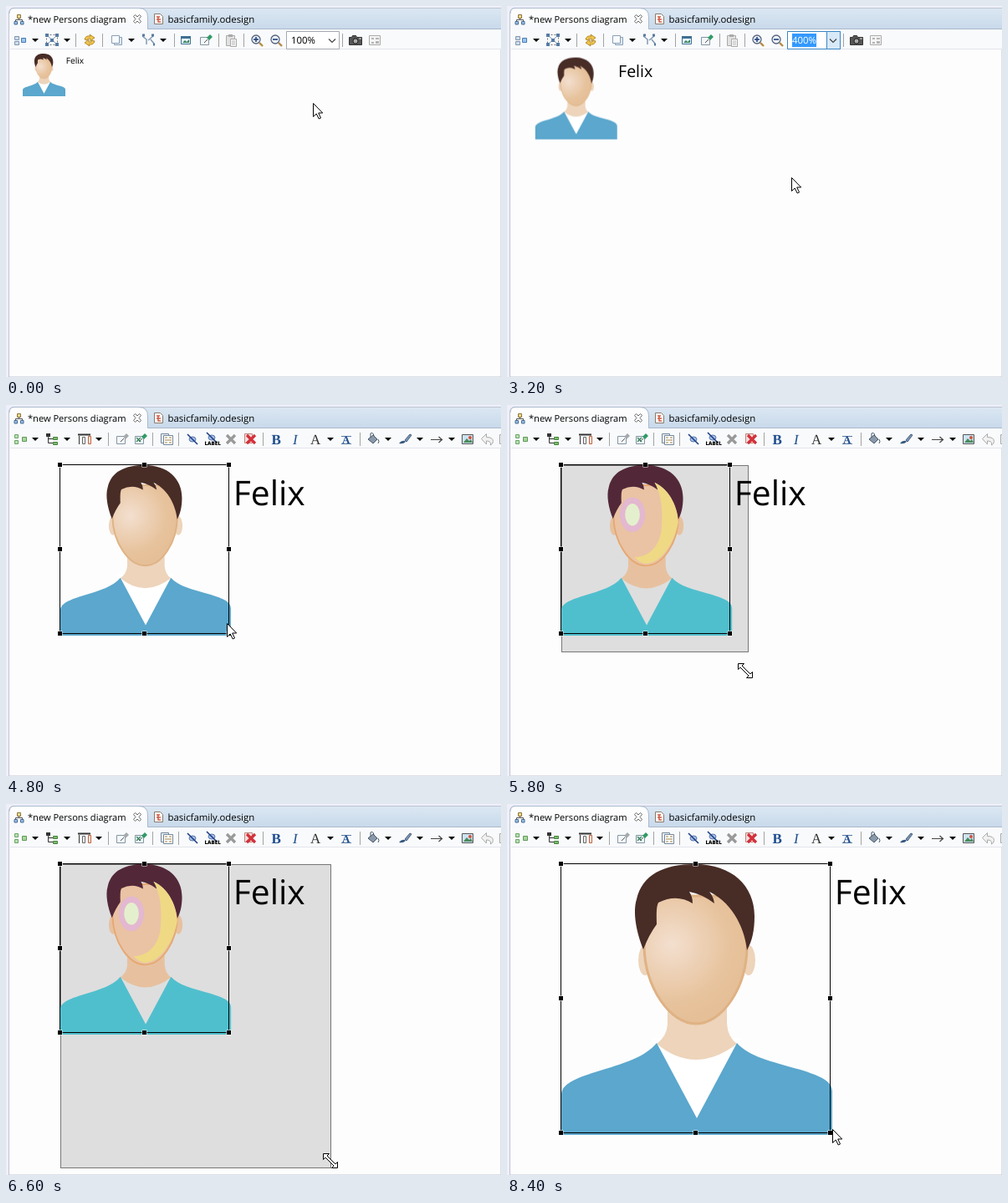
Recreate the animation shown at these times as an HTML page. Size 592 px wide and 444 px high, loop 9200 ms.

```html
<!DOCTYPE html>
<html lang="en">
<head>
<meta charset="utf-8">
<title>Persons diagram</title>
<style>
html, body { margin: 0; width: 100%; height: 100%; overflow: hidden; background: #fdfdfd; }
svg { display: block; }
text { font: 11.4px "Open Sans", "Noto Sans", sans-serif; text-rendering: geometricPrecision; }
.serif { font: 17px "Liberation Serif", "Noto Serif", serif; }

/* Portrait palette */
#scene { --hair: #482c26; --face: url(#skin); --edge: #dfb284; --neck: #edd4bb; --shirt: #5ba7cd; --collar: #fff; }
#ghost { --hair: #522838; --face: #eac3a4; --edge: #e6a873; --neck: #e7c19f; --shirt: #50bfcd; --collar: #dedede; }
.hair { fill: var(--hair); }
.face { fill: var(--face); stroke: var(--edge); stroke-width: 3; }
.neck { fill: var(--neck); }
.shirt { fill: var(--shirt); }
.collar { fill: var(--collar); }
.sel { fill: none; stroke: #000; marker: url(#handle); }

/* One loop is 46 steps of 200 ms */
.k { animation: 9.2s step-end infinite; }
#arrow { animation-name: arrow; }
#sizer { animation-name: sizer; }
#scene { animation-name: zoom; }
#man1 { animation-name: grow; }
#label { animation-name: shift; }
#ghost { animation-name: ghost; }
#rubber { animation-name: rubber; }
#small { animation-name: small; }
#large { animation-name: large; }
#tools2 { animation-name: tools2; }
#hot { animation-name: hot; }
#marked { animation-name: marked; }
#p100 { animation-name: p100; }
#p400 { animation-name: p400; }
#list { animation-name: list; }
.row { animation-name: row; }

@keyframes arrow {
  0% { transform: translate(367px, 116px); visibility: visible; }
  2.17% { transform: translate(368px, 109px); }
  4.34% { transform: translate(372px, 94px); }
  6.52% { transform: translate(378px, 74px); }
  8.69% { transform: translate(384px, 55px); }
  10.86% { transform: translate(386px, 45px); }
  13.04% { transform: translate(385px, 43px); }
  21.73% { transform: translate(380px, 75px); }
  23.91% { transform: translate(358px, 152px); }
  26.08% { transform: translate(342px, 203px); }
  28.26% { transform: translate(340px, 205px); }
  41.3% { transform: translate(330px, 214px); }
  43.47% { transform: translate(298px, 236px); }
  45.65% { transform: translate(262px, 254px); }
  49.99% { transform: translate(264px, 258px); }
  52.17% { transform: translate(264px, 261px); visibility: visible; }
  54.34% { transform: translate(389px, 415px); visibility: hidden; }
  86.95% { transform: translate(389px, 415px); visibility: visible; }
  89.13% { transform: translate(391px, 396px); }
  91.3%, 100% { transform: translate(389px, 389px); visibility: visible; }
}
@keyframes sizer {
  0% { visibility: hidden; transform: translate(267px, 273px); }
  54.34% { visibility: visible; transform: translate(267px, 273px); }
  60.86% { transform: translate(274px, 290px); }
  63.04% { transform: translate(285px, 318px); }
  65.21% { transform: translate(309px, 346px); }
  67.39% { transform: translate(340px, 381px); }
  69.56% { transform: translate(370px, 412px); }
  71.73% { transform: translate(388px, 427px); visibility: visible; }
  86.95%, 100% { transform: translate(388px, 427px); visibility: hidden; }
}
@keyframes zoom {
  0% { transform: translate(5px, 52px) scale(1); }
  32.6% { transform: translate(5px, 52px) scale(1.36); }
  34.78% { transform: translate(5px, 52px) scale(1.92); }
  36.95% { transform: translate(5px, 52px) scale(2.8); }
  39.13%, 100% { transform: translate(5px, 52px) scale(4); }
}
@keyframes grow {
  0% { transform: translate(15px, 5px) scale(.1574); }
  80.43%, 100% { transform: translate(15px, 5px) scale(.25); }
}
@keyframes shift {
  0% { transform: none; }
  80.43%, 100% { transform: translate(30px, 0); }
}
@keyframes ghost {
  0%, 80.43%, 100% { visibility: hidden; }
  56.52% { visibility: visible; }
}
@keyframes rubber {
  0% { width: 201px; height: 201px; }
  60.86% { width: 209px; height: 208px; }
  63.04% { width: 223px; height: 223px; }
  65.21% { width: 246px; height: 263px; }
  67.39% { width: 277px; height: 305px; }
  69.56% { width: 306px; height: 343px; }
  71.73%, 100% { width: 323px; height: 363px; }
}
@keyframes small {
  0%, 80.43%, 100% { visibility: hidden; }
  49.99% { visibility: visible; }
}
@keyframes large {
  0% { visibility: hidden; }
  80.43%, 100% { visibility: visible; }
}
@keyframes tools2 {
  0% { visibility: hidden; }
  49.99%, 100% { visibility: visible; }
}
@keyframes hot {
  0% { visibility: hidden; }
  8.69%, 100% { visibility: visible; }
}
@keyframes marked {
  0% { visibility: hidden; }
  15.21%, 100% { visibility: visible; }
}
@keyframes p100 {
  0% { fill: #000; visibility: visible; }
  15.21% { fill: #fff; visibility: visible; }
  30.43%, 100% { fill: #fff; visibility: hidden; }
}
@keyframes p400 {
  0% { visibility: hidden; }
  30.43%, 100% { visibility: visible; }
}
@keyframes list {
  0%, 30.43%, 100% { visibility: hidden; }
  15.21% { visibility: visible; }
}
@keyframes row {
  0% { transform: translate(0, 75px); }
  21.73% { transform: translate(0, 15px); }
  23.91% { transform: translate(0, 90px); }
  26.08%, 100% { transform: translate(0, 150px); }
}
</style>
</head>
<body>
<svg width="592" height="444" viewBox="0 0 592 444">
<defs>
  <linearGradient id="bar" x2="0" y2="1">
    <stop stop-color="#dbe7f3"/><stop offset="1" stop-color="#c8d9ea"/>
  </linearGradient>
  <linearGradient id="tab" x2="0" y2="1">
    <stop stop-color="#fff"/><stop offset="1" stop-color="#f6f8fb"/>
  </linearGradient>
  <radialGradient id="skin" gradientUnits="userSpaceOnUse" cx="132" cy="96" r="92">
    <stop stop-color="#f3dfcf"/><stop offset=".75" stop-color="#e7c39d"/><stop offset="1" stop-color="#e5bf97"/>
  </radialGradient>
  <marker id="handle" markerUnits="userSpaceOnUse" markerWidth="7" markerHeight="7" refX="3.5" refY="3.5">
    <path fill="#fff" d="M.5 .5h6v6h-6z"/><path d="M1 1h5v5h-5z"/>
  </marker>
  <clipPath id="picked"><rect class="k row" x="336" y="54" width="62" height="15"/></clipPath>

  <path id="dn" d="M-4 39h8l-4 4z"/>
  <path id="sep" d="M.5 33v16" stroke="#a3a3a3"/>
  <g id="lens">
    <path d="M3 44l4 4" stroke="#b58a45" stroke-width="2.4"/>
    <circle cx="-1" cy="40" r="5" fill="#eef5fc" stroke="#55617c" stroke-width="1.3"/>
    <path d="M-4 40h6" stroke="#20407c" stroke-width="1.6"/>
  </g>
  <g id="pin">
    <path d="M-6.5 37.5h10v9h-10z" fill="#f4f7fa" stroke="#8296a5"/>
    <path d="M-2 44l4-4" stroke="#555"/>
    <path d="M1 38l4-4 3 3-4 4z"/>
  </g>
  <path id="cross" d="M-5 36l10 10M5 36l-10 10" stroke-width="3.2"/>
  <g id="hide">
    <ellipse cy="41" rx="4" ry="3" fill="#a9c0e4" stroke="#5676b0"/>
    <path d="M-6 35L6 47" stroke="#1d3f86" stroke-width="1.6"/>
  </g>

  <g id="man">
    <path class="collar" d="M108 208h108L162 308z"/>
    <path class="neck" d="M127 165v27q-1 14-13 23 46 38 96 0-11-8-12-24v-26z"/>
    <ellipse class="neck" cx="100" cy="115" rx="8" ry="18"/>
    <ellipse class="neck" cx="224" cy="115" rx="8" ry="18"/>
    <path class="face" d="M99 98C100 148 130 191 161 191S222 148 222 98L216 38H108z"/>
    <path class="hair" d="M98 102C90 82 85 58 90 42 97 12 123 0 160 0c44 0 71 26 71 62 0 18-3 30-9 41C220 82 208 48 177 33q5 6 6 14Q169 36 153 33q4 6 4 14Q138 35 116 46c-3 6-2 17-2 26q-9 12-16 30z"/>
    <path class="shirt" d="M0 324v-48c0-13 18-20 40-27 36-11 60-18 74-35l48 90 48-90c14 16 40 22 76 32 22 7 38 13 38 26v52z"/>
  </g>
</defs>

<!-- Window -->
<rect width="592" height="444" fill="#efeffa"/>
<path d="M3.5 444V9q0-6.500 6.500-6.500H592V444z" fill="#fdfdfd" stroke="#bfc5d2"/>
<path d="M4 28V9q0-6 6-6H592V28z" fill="url(#bar)"/>
<path d="M4 28V9q0-6 6-6H159q10 0 10.500 10V28z" fill="url(#tab)"/>
<path d="M4 9q0-6.500 6-6.500H159q10.500 0 10.500 10.500v14.500H592" fill="none" stroke="#a9b9cd"/>
<g stroke="#8a7440" fill="#f2d887">
  <path d="M15.500 14v3M11.500 19v-2.500h8V19" fill="none" stroke="#555"/>
  <path d="M13.500 10.500h4v4h-4z"/>
  <path d="M10 18.500h3.500V22H10zM17.500 18.500H21V22h-3.500z" fill="#9cc3e8" stroke="#456a94"/>
</g>
<text x="26" y="20" style="font-size:11.1px">*new Persons diagram</text>
<path d="M152.500 12.500l2-2 2.500 2.500 2.500-2.500 2 2-2.500 3 2.500 3-2 2-2.500-2.500-2.500 2.500-2-2 2.500-3z" fill="#fff" stroke="#666"/>
<path d="M177.500 9.500h7l3 3v9h-10z" fill="#fff" stroke="#8a7a6a"/>
<path d="M180 13h4M180 16h5M182 13v6h3" stroke="#d05b45" fill="none" stroke-width="1.500"/>
<text x="193.500" y="20">basicfamily.odesign</text>
<path d="M5 28H592v23H5z" fill="#f9fafb"/>
<path d="M5 51.500H592" stroke="#e3e5ea"/>

<!-- Diagram -->
<g id="scene" class="k">
  <use id="man1" class="k" href="#man"/>
</g>
<g id="ghost" class="k">
  <rect id="rubber" class="k" x="65.500" y="72.500" width="201" height="201" fill="#dedede" stroke="#000" stroke-dasharray="1 1"/>
  <g transform="translate(65 72) scale(.63)">
    <use href="#man"/>
    <path d="M177 33C208 48 220 82 222 108c-8 45-36 79-61 79-8 0-16-5-22-12 30 0 48-24 51-53 3-34 1-64-13-89z" fill="#efd985"/>
    <ellipse cx="135" cy="94" rx="24" ry="33" fill="#e3b8d0"/>
    <ellipse cx="135" cy="94" rx="14" ry="21" fill="#e4f0cd"/>
  </g>
</g>
<g class="k" style="animation-name:zoom">
  <text id="label" class="k" x="66.700" y="17" style="font-size:10.2px">Felix</text>
</g>
<path id="small" class="k sel" d="M64.500 71.500H165.500H266.500V172.500V273.500H165.500H64.500V172.500z"/>
<path id="large" class="k sel" d="M64.500 71.500H225.500H386.500V232.500V393.500H225.500H64.500V232.500z"/>

<!-- Diagram tools -->
<g fill="none">
  <path d="M10.500 36.500h5v4h-5zM10.500 42.500h5v4h-5z" fill="#cfdcea" stroke="#8096ad"/>
  <path d="M18.500 38.500h5v5h-5z" fill="#9fc5ec" stroke="#477cb3"/>
  <path d="M48.500 34.500h13v12h-13z" stroke="#777" stroke-dasharray="2 2"/>
  <path d="M50 36l10 9M60 36l-10 9" stroke="#7394b8"/>
  <path d="M47 33h4v4h-4zM59 33h4v4h-4zM53 39h4v4h-4zM47 44h4v4h-4zM59 44h4v4h-4z" fill="#557ba3"/>
  <path d="M94 40q1-5 7-4l-1-2 6 4-5 4v-3q-4-1-4 2zM106 42q-1 5-7 4l1 2-6-4 5-4v3q4 1 4-2z" fill="#f0c44c" stroke="#a67c1c" stroke-width=".8"/>
  <path d="M129.500 37.500h9v9h-9z" fill="#dce7f2" stroke="#8aa0b5"/>
  <path d="M126.500 35.500h9v9h-9z" fill="#f8fbfe" stroke="#8aa0b5"/>
  <path d="M163 36l5 4v6M176 36l-6 5M173 40l4 5" stroke="#8199b2" stroke-width="1.500"/>
  <path d="M163 35h3M174 35h3M176 46h2" stroke="#57799d" stroke-width="3"/>
  <path d="M209.500 36.500h11v9h-11z" fill="#e9f4fb" stroke="#3e6f93"/>
  <path d="M209 36h12v3h-12z" fill="#3e6f93"/>
  <path d="M211 44l3-3 2 2 3-3v4z" fill="#38865c"/>
  <use href="#pin" x="239" fill="#2f9a67"/>
  <path d="M263.500 35.500h10v12h-10z" fill="#e2e2e2" stroke="#aaa"/>
  <path d="M266 34h5v3h-5z" fill="#aaa"/>
  <path d="M268.500 39.500h7v9h-7z" fill="#f6f6f6" stroke="#aaa"/>
  <path d="M270 42h4M270 44h4M270 46h4" stroke="#bbb"/>
  <use href="#lens" x="300"/><path d="M299 37v6" stroke="#20407c" stroke-width="1.600"/>
  <use href="#lens" x="323"/>
  <path d="M410.500 37.500h3l1-2h4l1 2h6v9h-15z" fill="#555" stroke="#333"/>
  <circle cx="418" cy="42" r="3" fill="#aaa" stroke="#222"/>
  <path d="M422 39h3" stroke="#ddd"/>
  <path d="M434.500 35.500h13v11h-13z" fill="#f4f4f4" stroke="#aaa"/>
  <path d="M437 38h3v2h-3zM442 38h4v2h-4zM437 43h3v2h-3zM442 42h4v3h-4z" fill="#b5b5b5"/>
</g>
<use href="#dn" x="35"/><use href="#dn" x="73"/><use href="#dn" x="150"/><use href="#dn" x="188"/>
<use href="#sep" x="83"/><use href="#sep" x="115"/><use href="#sep" x="201"/><use href="#sep" x="254"/>
<use href="#sep" x="284"/><use href="#sep" x="402"/>

<!-- Zoom box -->
<path d="M335.500 30.500h63v21h-63z" fill="#fff" stroke="#a5a9b0"/>
<g id="hot" class="k">
  <path d="M335.500 30.500h63v21h-63z" fill="#fff" stroke="#3b86c4"/>
  <path d="M382.500 30.500h16v21h-16z" fill="#d8e9f8" stroke="#3b86c4"/>
</g>
<path d="M386 39.500l4 4 4-4" fill="none" stroke="#444" stroke-width="1.200"/>
<path id="marked" class="k" d="M341 33h29v16h-29z" fill="#3399ff"/>
<text id="p100" class="k" x="341" y="45">100%</text>
<text id="p400" class="k" x="341" y="45" fill="#fff">400%</text>
<g id="list" class="k">
  <path d="M342 266h60V57h-3v208z" fill="#000" opacity=".28"/>
  <path d="M340 265h60V55" fill="none" stroke="#888" stroke-width="2"/>
  <path d="M335.500 52.500h63v212h-63z" fill="#fff" stroke="#2d80bb"/>
  <text id="rows"><tspan x="338" y="66">5%</tspan><tspan x="338" dy="15">10%</tspan><tspan x="338" dy="15">25%</tspan><tspan x="338" dy="15">50%</tspan><tspan x="338" dy="15">75%</tspan><tspan x="338" dy="15">100%</tspan><tspan x="338" dy="15">125%</tspan><tspan x="338" dy="15">150%</tspan><tspan x="338" dy="15">175%</tspan><tspan x="338" dy="15">200%</tspan><tspan x="338" dy="15">400%</tspan><tspan x="338" dy="15">Page</tspan><tspan x="338" dy="15">Height</tspan><tspan x="338" dy="15">Width</tspan></text>
  <g clip-path="url(#picked)">
    <path d="M336 53h62v211h-62z" fill="#3399ff"/>
    <use href="#rows" fill="#fff"/>
  </g>
</g>

<!-- Element tools -->
<g id="tools2" class="k">
  <path d="M5 28H592v24H5z" fill="#f9fafb"/>
  <path d="M5 51.500H592" stroke="#e3e5ea"/>
  <g fill="none">
    <path d="M10.500 35.500h4v4h-4zM10.500 42.500h4v4h-4z" fill="#b9dfb1" stroke="#6ba468"/>
    <path d="M19.500 38.500h5v5h-5z" fill="#a9d59d" stroke="#5d9a58"/>
    <path d="M50.500 37v8.500H56M50.500 40.500H56" stroke="#333"/>
    <path d="M48 34h5v4h-5z" fill="#333"/>
    <path d="M56.500 38.500h5v3h-5zM56.500 44.500h5v3h-5z" fill="#7dbb6d" stroke="#45833e"/>
    <path d="M86 35.500h15" stroke="#333" stroke-width="2"/>
    <path d="M87.500 37v10" stroke="#333"/>
    <path d="M91.500 38.500h3v8h-3z" fill="#fff" stroke="#666"/>
    <path d="M98.500 37.500h3v9h-3z" fill="#fff" stroke="#c1603a"/>
    <use href="#pin" x="139" fill="#a5a9ad"/>
    <use href="#pin" x="161" fill="#2f9a67"/><path d="M156 39l5 5m0-5l-5 5" stroke="#3d8a63" stroke-width="1.500"/>
    <path d="M185.500 34.500h9v11h-9z" fill="#eef3f8" stroke="#72879b"/>
    <path d="M188.500 36.500h11v11h-11z" fill="#fff" stroke="#72879b"/>
    <path d="M190 39h3M195 39h3M190 42h8M190 45h3M195 45h3" stroke="#a08245"/>
    <use href="#hide" x="223"/><use href="#hide" x="246" y="-2"/>
    <use href="#cross" x="269" stroke="#999"/>
    <path d="M285.500 34.500h9v11h-9z" fill="#f7dedb" stroke="#bb8580"/>
    <use href="#cross" x="293" stroke="#d3303a"/>
    <path d="M401 37.500h12M401 46.500h12" stroke="#5579a5"/>
    <path d="M433 41l6-5 5 5-5 5z" fill="#8a99aa" stroke="#44566a"/>
    <path d="M436 39v-5q3-2 4 3M445 41q2 3 0 5" stroke="#44566a"/>
    <path d="M483 35l-6 7 2 2 6-8z" fill="#7b93b3" stroke="#47617f"/>
    <path d="M470 46q3-4 7-3l1 1q-3 3-8 2z" fill="#35577f"/>
    <path d="M508 41.500h13M517.500 38l4 3.500-4 3.500" stroke="#444" stroke-width="1.200"/>
    <path d="M545.500 35.500h13v11h-13z" fill="#cce3f3" stroke="#555"/>
    <path d="M547 45l4-5 3 3 2-2 2 4z" fill="#4b8a5c"/><circle cx="555" cy="39" r="2" fill="#d0533b"/>
    <path d="M568.500 40.500l6-6v4q8 0 8 5 0 3-3 4.500 1-5-5-5v4z" fill="#f1f1f1" stroke="#aaa"/>
    <path d="M590.500 35.500h6v11h-6z" fill="#eee" stroke="#aaa"/>
  </g>
  <text x="237.500" y="48" style="font-size:6.2px;font-weight:800">LABEL</text>
  <g fill="#1f4f8f">
    <text class="serif" x="317.500" y="47" style="font-weight:700">B</text>
    <text class="serif" x="343" y="47" style="font-style:italic">I</text>
    <text class="serif" x="364" y="47" fill="#333">A</text>
    <text class="serif" x="402" y="46" style="font-size:13px;font-weight:700">A</text>
  </g>
  <use href="#dn" x="35"/><use href="#dn" x="73"/><use href="#dn" x="111"/><use href="#dn" x="388"/>
  <use href="#dn" x="457"/><use href="#dn" x="495"/><use href="#dn" x="533"/>
  <use href="#sep" x="122"/><use href="#sep" x="175"/><use href="#sep" x="206"/><use href="#sep" x="307"/><use href="#sep" x="423"/>
</g>

<!-- Pointers -->
<path id="arrow" class="k" d="M.5 .5v16l3.700-3.500 3 6 2.300-1-2.800-6h5z" fill="#fff" stroke="#000"/>
<path id="sizer" class="k" d="M-8.500-8.500h7l-2.500 2.500L6 4l2.500-2.500v7h-7L4 6-6-4l-2.500 2.500z" fill="#fff" stroke="#000"/>
</svg>
</body>
</html>
```
